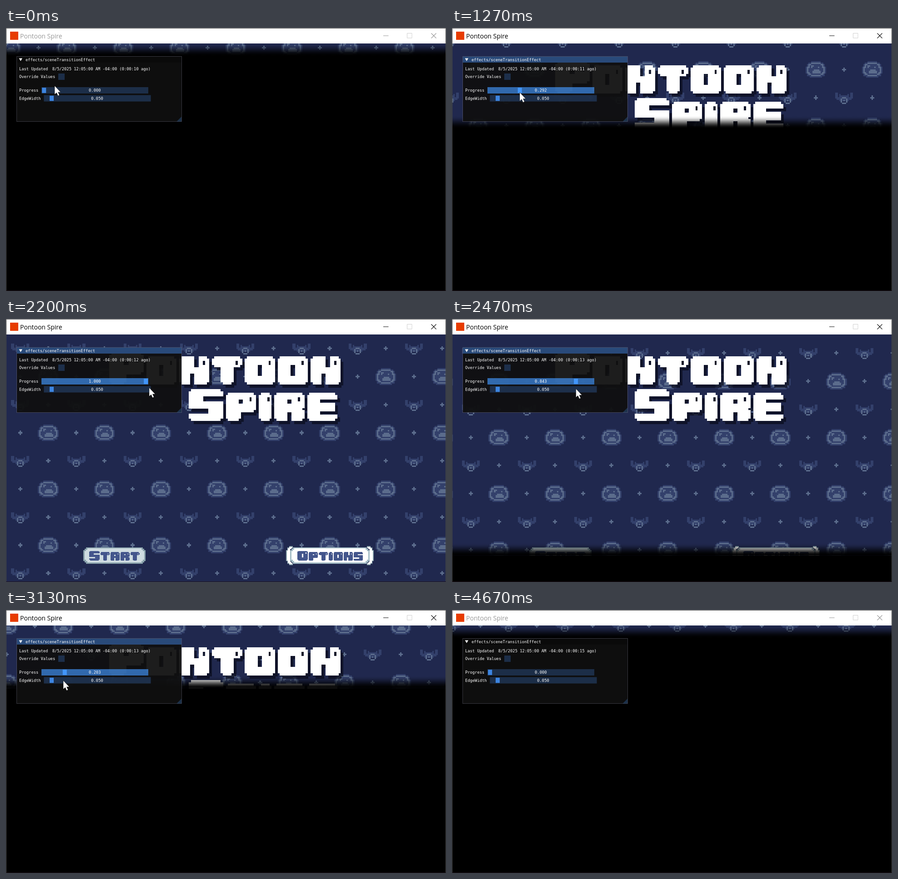
An HTML page that plays this animation: 968 by 578 pixels, repeating every 4740 ms.

```html
<!DOCTYPE html>
<html lang="en">
<head>
<meta charset="utf-8">
<title>Pontoon Spire</title>
<style>
  html, body { margin: 0; width: 100%; height: 100%; overflow: hidden; background: #000; }
  svg { display: block; width: 968px; height: 578px; }
  .px { shape-rendering: crispEdges; }
  .mono { font: 8.77px "DejaVu Sans Mono", monospace; fill: #fff; white-space: pre; }
  .caption { font: 14px "Open Sans", sans-serif; }
</style>
</head>
<body>
<svg viewBox="0 0 968 578" xmlns="http://www.w3.org/2000/svg">
  <defs>
    <clipPath id="client"><rect x="1" y="34" width="966" height="543"/></clipPath>
    <linearGradient id="fade" x1="0" y1="0" x2="0" y2="1"></linearGradient>
    <g id="slime">
      <path fill="#33406b" d="M-3.5-6h7v1h2v1h1v2h1v5h-1v2h-2v1h-9v-1h-2v-2h-1v-5h1v-2h1v-1h2z"/>
      <path fill="#5b6c8c" d="M-3.5-5h7v1h2v2h1v5h-1v1h-2v1h-7v-1h-2v-1h-1v-5h1v-2h2z"/>
      <path fill="#33406b" d="M-3.5-4h7v1h1v2h1v3h-1v1h-1v1h-7v-1h-1v-1h-1v-3h1v-2h1z"/>
      <path fill="#5b6c8c" d="M-3.5-3h2v1h-1v1h-1zM1.5-2h1v1h-1zM-1.5 0h4v1h1v2h-6v-2h1z"/>
    </g>
    <g id="bat">
      <path id="wing" fill="#33406b" d="M-5.5-4.5v1h1v3h1v-2h1v2h1v3h-2v-1h-2v-1h-1v-4h1v-1z"/>
      <use href="#wing" transform="scale(-1 1)"/>
      <path fill="#33406b" d="M-2.5-1.5h5v4h-5z"/>
      <path fill="#5b6c8c" fill-rule="evenodd" d="M-1.5-.5h3v1h1v3h-1v1h-3v-1h-1v-3h1zM-1.5.5v3h3v-3zM-.5 1.5h1v1h-1z"/>
    </g>
    <path id="dot" fill="#5b6c8c" d="M-.5-1.5h1v1h1v1h-1v1h-1v-1h-1v-1h1z"/>
    <path id="bracket" d="M8 0h8v3h-3v3h-3v30h3v3h3v3h-8v-3h-4v-6h-3v-24h3v-6h4z"/>
  </defs>

  <rect width="968" height="578" fill="#000"/>
  <g clip-path="url(#client)">
    <rect y="34" width="968" height="544" fill="#20284e"/>
    <g id="tiles" class="px"></g>
    <g id="logo" class="px"></g>
    <g id="buttons" class="px"></g>
    <g id="shade">
      <rect width="968" height="27.2" fill="url(#fade)"/>
      <rect y="27" width="968" height="600"/>
    </g>
  </g>

  <g>
    <rect x="24" y="62.5" width="362" height="143" fill="#0f0f0f" fill-opacity=".94"/>
    <rect id="bar" x="24" y="62.5" width="362" height="13.5"/>
    <rect x="23.5" y="62.5" width="363" height="143" fill="none" stroke="#6e6e80" stroke-opacity=".5"/>
    <path d="M386 195v10.5h-10.5z" fill="#4296fa" fill-opacity=".25"/>
    <path d="M28.5 66.5h7.4l-3.7 6.2z" fill="#fff"/>
    <rect x="115" y="100" width="14" height="14" fill="#294a7a" fill-opacity=".54"/>
    <rect id="track" x="78" y="130" width="235" height="14"/>
    <rect id="grab" y="131.2" width="9" height="11.6"/>
    <rect x="83.3" y="147.5" width="235.3" height="14" fill="#294a7a" fill-opacity=".54"/>
    <rect x="96" y="148.8" width="9" height="11.4" fill="#3d85e0"/>
    <g class="mono">
      <text x="43" y="72.8">effects/sceneTransitionEffect</text>
      <text x="29" y="93.2">Last Updated</text>
      <text id="stamp" x="101.7" y="93.2"></text>
      <text x="29" y="110.3">Override Values</text>
      <text x="29" y="140.4">Progress</text>
      <text id="value" x="195.3" y="140.4" text-anchor="middle"></text>
      <text x="29" y="157.7">EdgeWidth</text>
      <text x="200.5" y="157.7" text-anchor="middle">0.050</text>
    </g>
  </g>

  <rect width="968" height="34" fill="#fff"/>
  <path d="M.5 578V.5h967V578" fill="none" stroke="#444"/>
  <path d="M0 577.5h968" stroke="#20141c"/>
  <rect x="9" y="8" width="18" height="18" fill="#e73c00"/>
  <text id="caption" class="caption" x="31" y="23">Pontoon Spire</text>
  <path d="M882.5 11.5h10.500v10.500h-10.500z" fill="none" stroke="#d0d0d0"/>
  <path id="controls" d="M830 17h11.500M935.500 11.500l11 11m0-11l-11 11" fill="none" stroke-width="1.1"/>
  <path id="cursor" d="M0 0v19l4.300-3.800 3 6.800 3.200-1.400-3-6.600h5.700z" fill="#fff" stroke="#000" stroke-width=".5"/>
</svg>
<script>
const $ = id => document.getElementById(id);
const set = (el, attrs) => { for (const k in attrs) el.setAttribute(k, attrs[k]); };
const add = (parent, tag, attrs) => {
  const el = document.createElementNS('http://www.w3.org/2000/svg', tag);
  set(el, attrs);
  return parent.appendChild(el);
};

// Chunky letters on a 14 by 13 grid; holes are cut by the even-odd rule.
const body = 'M1 0h12v1h1v11h-1v1h-12v-1h-1v-11h1z';
const glint = 'M11 2h1v2h-1z';
const glyphs = {
  O: body + 'M6 4h2v5h-2z' + glint,
  P: 'M1 0h12v1h1v7h-1v1h-6v3h-1v1h-5v-1h-1v-11h1zM6 3h2v2h-2z' + glint,
  N: body + 'M7 0h2v5h-2zM5 8h2v5h-2z' + glint,
  T: 'M1 0h12v1h1v3h-1v1h-3v7h-1v1h-4v-1h-1v-7h-3v-1h-1v-3h1z' + glint,
  S: body + 'M6 3h8v2h-8zM0 8h8v2h-8z',
  I: 'M1 0h4v1h1v11h-1v1h-4v-1h-1v-11h1zM4 2h1v2h-1z',
  R: body + 'M6 3h2v2h-2zM6 9h2v4h-2zM13 7h1v1h-1z' + glint,
  E: body + 'M6 3h8v1.500h-8zM6 8.500h8v1.500h-8zM13 4.500h1v4h-1z',
  A: body + 'M6 4h2v2h-2zM6 9h2v4h-2z' + glint
};

function word(parent, str, x, base, unit, fill, opacity = 1) {
  [...str].forEach((ch, i) => {
    const s = i ? unit : unit * 1.14;
    add(parent, 'path', {
      d: glyphs[ch], fill, 'fill-opacity': opacity, 'fill-rule': 'evenodd',
      transform: `translate(${x} ${base - 13 * s}) scale(${s})`
    });
    x += (ch === 'I' ? 6 : 14) * s + 1.25 * unit;
  });
}

for (const [dx, fill, opacity] of [[6, '#0a0d1c', .75], [0, '#fff', 1]]) {
  word($('logo'), 'PONTOON', 227 + dx, 144 + dx * 1.1, 4.74, fill, opacity);
  word($('logo'), 'SPIRE', 402 + dx, 224 + dx * 1.1, 4.74, fill, opacity);
}

function plate(x, y, w, h, fill) {
  const c = 3;
  add($('buttons'), 'path', {
    fill,
    d: `M${x + 2 * c} ${y}h${w - 4 * c}v${c}h${c}v${c}h${c}v${h - 4 * c}h${-c}v${c}h${-c}v${c}` +
       `h${4 * c - w}v${-c}h${-c}v${-c}h${-c}v${4 * c - h}h${c}v${-c}h${c}z`
  });
}
plate(170, 502, 137, 36, '#8ba4ad');
plate(173, 504, 131, 31, '#cfdce1');
word($('buttons'), 'START', 183, 531, 1.44, '#44568c');
plate(625, 502, 175, 36, '#a3bcc5');
plate(628, 504, 169, 31, '#fff');
word($('buttons'), 'OPTIONS', 641, 531, 1.45, '#44568c');
for (const side of ['translate(615 499)', 'translate(810 499) scale(-1 1)']) {
  add($('buttons'), 'use', { href: '#bracket', fill: '#8ba4ad', transform: side });
  add($('buttons'), 'use', { href: '#bracket', fill: '#fff', transform: side + ' translate(2 2) scale(.8 .9)' });
}

const cellX = 123.8, cellY = 123.5;
for (let row = -1; row < 6; row++) {
  for (let col = -1; col < 9; col++) {
    const put = (name, dx, dy) => add($('tiles'), 'use', {
      href: '#' + name,
      transform: `translate(${(col + dx) * cellX} ${(row + dy) * cellY}) scale(3.019)`
    });
    put('slime', 0, 0);
    put('dot', .5, 0);
    put('dot', 0, .5);
    put('bat', .5, .5);
  }
}

for (let i = 0; i <= 8; i++) {
  const u = i / 8;
  add($('fade'), 'stop', { offset: u, 'stop-color': '#000', 'stop-opacity': u * u * (3 - 2 * u) });
}

// Pointer path: step, x, y, progress
const keys = [
  [0, 107, 127, 0], [3, 95, 134, 0], [6, 86, 137, 0], [10, 83, 137, 0],
  [12, 88.5, 137, .024], [14, 92, 138, .04], [17, 120, 140, .165], [21, 178, 143, .42],
  [24, 226, 145, .625], [25, 241, 145, .686], [28, 290, 147, .9], [30, 315, 150, 1],
  [33, 315, 151, 1], [35, 306, 152, .99], [38, 256, 154, .77], [40, 226, 155, .64],
  [41, 209, 155, .574], [44, 154, 155, .33], [47, 112, 155, .14], [50, 95, 155, .05],
  [54, 88, 155, .027], [56, 86, 195, 0]
];

function pose(k) {
  const i = keys.findIndex(key => key[0] > k);
  if (i < 0) return keys[keys.length - 1].slice(1);
  const a = keys[i - 1], b = keys[i], u = (k - a[0]) / (b[0] - a[0]);
  return a.slice(1).map((v, j) => v + (b[j + 1] - v) * u);
}

const loop = 4740, steps = 71;
const wrap = (v, m) => ((v % m) + m) % m;

function draw(time) {
  const k = Math.min(steps - 1, Math.floor(time * .015 + .02));
  const t = k * 200 / 3;
  const [x, y, p] = pose(k);
  const focused = k >= 10 && k < 66;
  const dragging = k >= 10 && k < 56;
  const hover = k < 10 && y >= 130;

  const shift = (t - 2200) * .03774;
  set($('tiles'), { transform: `translate(${wrap(93 + shift, cellX)} ${wrap(250 + shift, cellY)})` });
  set($('shade'), { transform: `translate(0 ${34 + p * 543.4})` });

  set($('bar'), { fill: focused ? '#294a7a' : '#0a0a0a' });
  set($('track'), {
    fill: dragging || hover ? '#4296fa' : '#294a7a',
    'fill-opacity': dragging ? .67 : hover ? .4 : .54
  });
  set($('grab'), { x: 79.2 + p * 224, fill: dragging ? '#4296fa' : '#3d85e0' });
  $('value').textContent = p.toFixed(3);
  $('stamp').textContent = `8/5/2025 12:05:00 AM -04:00 (0:00:${10 + Math.floor((t + 550) / 1000)} ago)`;

  set($('caption'), { fill: focused ? '#000' : '#999' });
  set($('controls'), { stroke: focused ? '#111' : '#999' });
  set($('cursor'), {
    transform: `translate(${x} ${y})`,
    visibility: k < 58 ? 'visible' : 'hidden'
  });
}

const start = performance.now();
function tick() {
  draw((performance.now() - start) % loop);
  requestAnimationFrame(tick);
}
tick();
</script>
</body>
</html>
```
